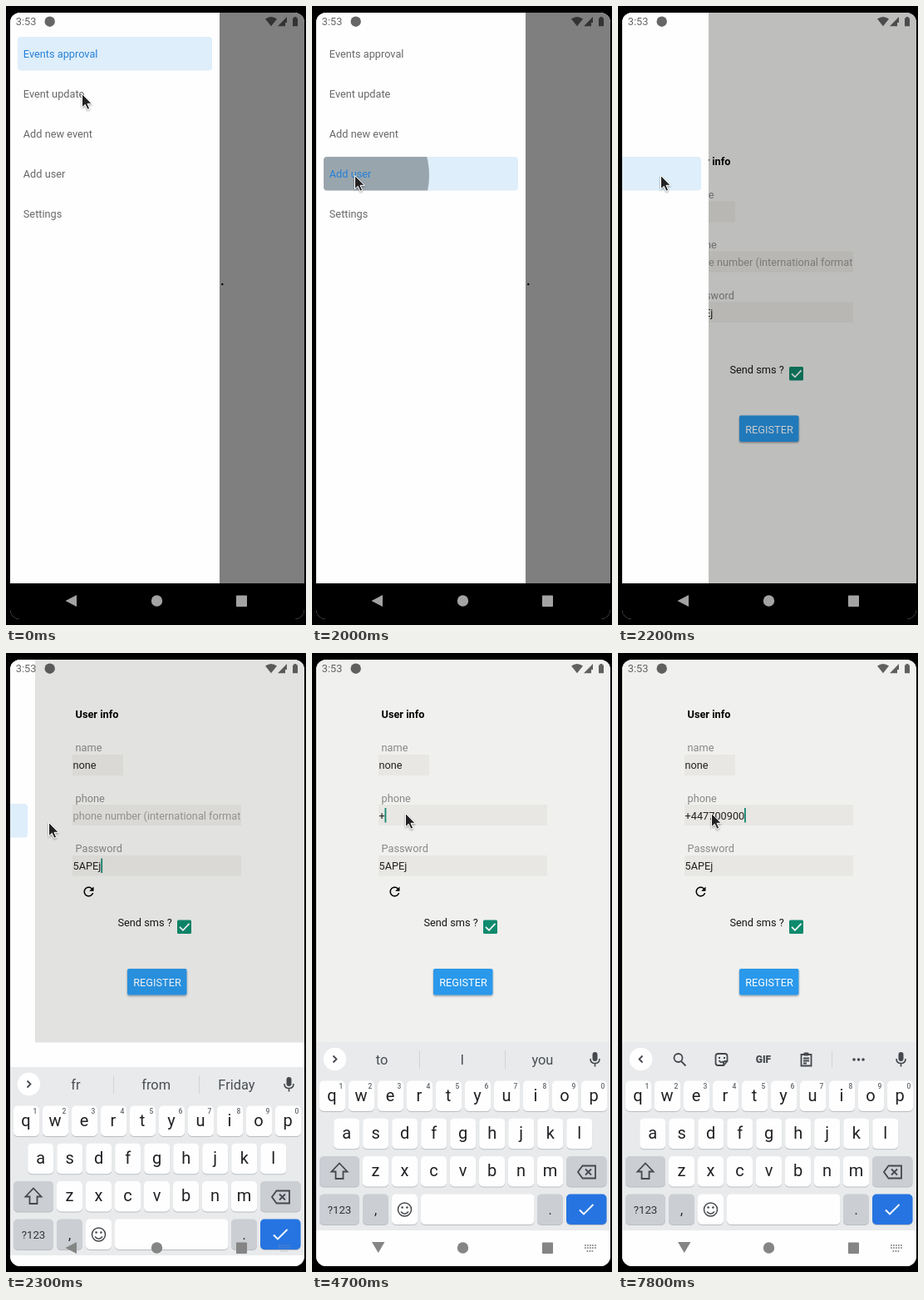
Animation of 361 by 743 pixels, one loop 8000 ms. Source, as an HTML page:

```html
<!DOCTYPE html>
<html lang="en">
<head>
<meta charset="utf-8">
<title>User registration demo</title>
<style>
html, body { margin: 0; width: 100%; height: 100%; overflow: hidden; background: #000; }
svg { display: block; width: 361px; height: 743px; }
text { font: 12.75px Roboto, sans-serif; white-space: pre; }
.label { fill: #888; }
.value { fill: #222; }
.field { fill: #e8e7e3; }
.caret { fill: #14866f; }
.key { fill: #fefefe; }
.fn { fill: #cbced3; }
.line { fill: none; stroke: #45484c; stroke-width: 1.8; }
.big { font-size: 20px; fill: #202124; }
.hint { font-size: 8.5px; font-weight: 500; fill: #63676b; }
.word { font-size: 16.4px; fill: #4a4d51; }
.mid { text-anchor: middle; }
</style>
</head>
<body>
<svg viewBox="0 0 361 743">
  <defs>
    <clipPath id="screen"><rect x="5" y="8" width="354" height="728" rx="12"/></clipPath>
    <clipPath id="phoneClip"><rect x="80" y="182" width="203" height="25"/></clipPath>
    <clipPath id="itemClip"><rect x="14" y="181" width="234" height="40.5" rx="4"/></clipPath>
    <filter id="soft" x="-30%" y="-30%" width="160%" height="180%">
      <feDropShadow dx="0" dy="1.2" stdDeviation="1.2" flood-opacity=".4"/>
    </filter>
  </defs>
  <rect width="361" height="743"/>
  <g clip-path="url(#screen)">
    <rect x="5" y="8" width="354" height="728" fill="#fefefe"/>
    <rect id="page" x="5" y="8" width="354"/>
    <circle id="dot" cx="260.3" cy="334" r="1.2"/>
    <g id="form">
      <text x="83.5" y="78" font-weight="700" style="font-weight:700">User info</text>
      <text class="label" x="83.5" y="118">name</text>
      <rect class="field" x="80" y="122" width="61" height="25"/>
      <text class="value" x="80.5" y="139">none</text>
      <text class="label" x="83.5" y="178.5">phone</text>
      <rect class="field" x="80" y="182" width="203" height="25"/>
      <g clip-path="url(#phoneClip)">
        <text id="empty" x="80.5" y="199.5" fill="#999">phone number (international format)</text>
        <text id="phone" class="value" x="80.5" y="199.5"></text>
      </g>
      <rect id="phoneCaret" class="caret" y="186" width="1.8" height="17.5"/>
      <text class="label" x="83.5" y="239">Password</text>
      <rect class="field" x="80" y="243" width="203" height="24.5"/>
      <text id="pass" class="value" x="80.5" y="260">5APEj</text>
      <rect id="passCaret" class="caret" x="114.3" y="246.5" width="1.8" height="17.5"/>
      <path transform="translate(90.5 277.5) scale(.75)" d="M17.65 6.35C16.2 4.9 14.21 4 12 4c-4.42 0-8 3.58-8 8s3.58 8 8 8c3.73 0 6.84-2.55 7.73-6h-2.08c-.82 2.33-3.04 4-5.65 4-3.31 0-6-2.69-6-6s2.69-6 6-6c1.66 0 3.14.69 4.22 1.78L13 11h7V4z"/>
      <text x="134.5" y="328" fill="#151515">Send sms ?</text>
      <rect x="206" y="320.5" width="17" height="16.5" rx="1.5" fill="#0e8a6d"/>
      <path d="M209 328.8l4 4 7.5-8" fill="none" stroke="#fff" stroke-width="1.7"/>
      <rect x="146" y="379" width="71.5" height="31.5" rx="2" fill="#2a98eb" filter="url(#soft)"/>
      <text class="mid" x="182" y="400" fill="#fff">REGISTER</text>
    </g>
    <rect id="scrim" x="5" y="8" width="354"/>
    <g id="drawer">
      <rect x="5" y="8" width="252" height="685" fill="#fefefe"/>
      <rect id="mark" x="14" width="234" height="40.5" rx="4" fill="#deeefa"/>
      <g clip-path="url(#itemClip)"><circle id="ripple" cx="51" cy="203" opacity=".31"/></g>
      <g id="items"></g>
    </g>
    <rect id="navBar" x="5" y="693" width="354" height="43"/>
    <g id="keyboard">
      <rect x="5" y="467" width="354" height="226" fill="#e8eaec"/>
      <circle cx="27.5" cy="487.5" r="13.7" fill="#fff"/>
      <path id="chevron" class="line"/>
      <g id="words"></g>
      <g id="tools">
        <circle class="line" cx="72.5" cy="486" r="5"/>
        <path class="line" d="M76 490l5.5 5.5"/>
        <path class="line" d="M127 495h-6.500q-3 0-3-3v-8q0-3 3-3h8q3 0 3 3v6zM127 495v-3q0-2 2-2h3M121.500 489q2.500 4 5 1"/>
        <path d="M121 485h2v2h-2zM127 485h2v2h-2z" fill="#45484c"/>
        <text class="mid" x="175" y="492" fill="#45484c" style="font-weight:900;font-size:12px">GIF</text>
        <path class="line" d="M220.500 482h12v13.500h-12zM223 486.500h7M223 489.500h7M223 492.500h4"/>
        <rect x="223.500" y="479.500" width="6" height="4" rx="1" fill="#45484c"/>
        <path d="M257.500 477.500v20" stroke="#d2d5d8"/>
        <g fill="#45484c"><circle cx="284" cy="488" r="1.800"/><circle cx="289.500" cy="488" r="1.800"/><circle cx="295" cy="488" r="1.800"/></g>
      </g>
      <rect x="337.500" y="479" width="6" height="11" rx="3" fill="#45484c"/>
      <path class="line" d="M335 487q0 5.500 5.500 5.500t5.500-5.500M340.500 492.500v4" style="stroke-width:1.6"/>
      <g id="keys"></g>
      <path class="line" d="M33 612.500l9.500 10h-5v8.500h-9v-8.500h-5z"/>
      <path class="line" d="M325.500 615.500h15.500v15h-15.500l-5.500-7.500zM329 619.500l7 7M336 619.500l-7 7"/>
      <text class="mid" x="33" y="673" fill="#333" style="font-size:13.300px">?123</text>
      <text class="mid big" x="76.500" y="674" style="font-size:16px">,</text>
      <text class="mid big" x="286.500" y="674" style="font-size:16px">.</text>
      <circle class="line" cx="111.500" cy="668" r="8" style="stroke-width:1.500"/>
      <path class="line" d="M107 670.500q4.500 5.500 9 0" style="stroke-width:1.500"/>
      <g fill="#45484c"><circle cx="108.600" cy="665.500" r="1.300"/><circle cx="114.400" cy="665.500" r="1.300"/></g>
      <path d="M322 668.500l5 5 11.500-11.500" fill="none" stroke="#fff" stroke-width="1.900"/>
    </g>
    <g id="nav">
      <path id="back"/>
      <circle cx="181.500" cy="714" r="6.700"/>
      <rect x="277" y="707.500" width="13" height="13.500" rx=".8"/>
      <path id="imeIcon" d="M328 711h14M328 714h14M330.500 718h9" fill="none" stroke="#999" stroke-width="1.800" stroke-dasharray="1.800 1.200"/>
    </g>
    <g opacity=".6">
      <text x="11.800" y="23.300">3:53</text>
      <circle cx="52.700" cy="18.700" r="6.200"/>
      <path d="M312 15.500q7-5 14 0l-7 8.700z"/>
      <path d="M327 24.200l11-11.200v7h-2v4.200z"/>
      <path d="M345 14.500h1.500v-1.500h3v1.500h1.500v9.700h-6z"/>
    </g>
  </g>
  <path id="cursor" d="M.5.5v16.300l3.800-3.500 2.700 6 2.700-1.200-2.700-5.800h5.200z" fill="#222" stroke="#fff" stroke-width="1" filter="url(#soft)"/>
</svg>
<script>
const $ = id => document.getElementById(id);
const LOOP = 8000, STEP = 100;

// Rows of [time, value...]; each holds until the next one.
const pointer = [
  [0, 91, 105], [100, 91, 102], [300, 91, 97], [400, 90, 92], [500, 86, 101], [600, 82, 115],
  [700, 77, 131], [800, 73, 143], [900, 72, 148], [1200, 71, 150], [1300, 69, 138], [1400, 67, 125],
  [1600, 62, 150], [1700, 54, 188], [1800, 51, 203], [2800, 70, 201], [2900, 100, 194], [3000, 111, 192],
  [3100, 112, 192]
];
const slide = [[0, 0], [2100, 59], [2200, 148], [2300, 222], [2400, 247], [2500, 252]];
const ripples = [[0, 0], [2000, 90], [2100, 192], [2200, 0]];
const rise = [[0, 300], [2300, 30], [2400, 5], [2500, 0]];
const strips = [[0, "fr from Friday"], [2600, ""], [4700, "to I you"], [4900, ""]];
const carets = [
  [0, ""], [2300, "pass"], [2800, ""], [3200, "pass"], [3500, "phone"], [4000, ""],
  [4400, "phone"], [5800, ""], [6200, "phone"]
];
const number = "+447700900";
const strokes = [4400, 4800, 4900, 5200, 6400, 6500, 6900, 7100, 7600, 7800];

const at = (rows, t) => rows.filter(r => r[0] <= t).pop().slice(1);
const show = (id, on) => $(id).setAttribute("visibility", on ? "visible" : "hidden");
const set = (id, attrs) => {
  for (const name in attrs) $(id).setAttribute(name, attrs[name]);
};

const labels = ["Events approval", "Event update", "Add new event", "Add user", "Settings"];
$("items").innerHTML = labels.map((s, i) => `<text x="20.800" y="${62 + 48 * i}">${s}</text>`).join("");

function key(x, y, w, fill) {
  const box = (dy, f) => `<rect x="${x}" y="${y + dy}" width="${w}" height="36.500" rx="5" ${f}/>`;
  return box(1, 'fill="#b9bdc1"') + box(0, fill);
}

function buildKeys() {
  const plain = 'class="key"', dim = 'class="fn"';
  let out = "";
  [["qwertyuiop", 24.5, 513.5], ["asdfghjkl", 41.7, 558.7], ["zxcvbnm", 76.5, 604]].forEach(([row, x0, y], r) => {
    [...row].forEach((c, i) => {
      const x = x0 + 35 * i;
      out += key(x - 15.5, y, 31, plain) + `<text class="mid big" x="${x - (r ? 0 : .5)}" y="${y + 24.3}">${c}</text>`;
      if (!r) out += `<text class="mid hint" x="${x + 10.5}" y="${y + 9.5}">${(i + 1) % 10}</text>`;
    });
  });
  out += key(9, 604, 48, dim) + key(306, 604, 48.5, dim);
  out += key(9, 649.5, 48, dim) + key(61, 649.5, 31, dim) + key(96, 649.5, 31, plain);
  out += key(131, 649.5, 136.5, plain) + key(271, 649.5, 31, dim) + key(306, 649.5, 48.5, 'fill="#2674e1"');
  $("keys").innerHTML = out;
}

function drawStrip(words) {
  set("chevron", { d: words ? "M25.500 483.500l4 4-4 4" : "M29.500 483.500l-4 4 4 4" });
  show("tools", !words);
  $("words").innerHTML = !words ? "" : '<path d="M129.500 477v22M232.500 477v22" stroke="#d2d5d8"/>' +
    words.split(" ").map((w, i) => `<text class="mid word" x="${84 + 96.7 * i}" y="494">${w}</text>`).join("");
}

function draw(t) {
  const [shift] = at(slide, t);
  const open = 1 - shift / 252;
  const onForm = t >= 2100, typing = t >= 2300;
  const bottom = typing ? 467.5 : 693;

  set("page", { height: bottom - 8, fill: onForm ? "#f0f0ee" : "#fff" });
  show("dot", !onForm);
  set("form", { transform: `translate(0 ${typing ? 0 : 112.5})`, display: onForm ? "inline" : "none" });
  set("scrim", { height: bottom - 8, opacity: open * .5 });

  const chosen = t >= 2000 ? 3 : 0;
  set("drawer", { transform: `translate(${-shift} 0)` });
  set("mark", { y: 37 + 48 * chosen });
  set("ripple", { r: at(ripples, t)[0] });
  [...$("items").children].forEach((el, i) => el.setAttribute("fill", i === chosen ? "#2581d8" : "#686868"));

  const text = number.slice(0, strokes.filter(s => s <= t).length);
  const [caret] = at(carets, t);
  $("phone").textContent = text;
  set("empty", { display: text ? "none" : "inline" });
  set("phoneCaret", { x: 80.3 + (text ? $("phone").getComputedTextLength() : 0), display: caret === "phone" ? "inline" : "none" });
  set("passCaret", { display: caret === "pass" ? "inline" : "none" });

  const settled = t >= 2400;
  set("keyboard", { transform: `translate(0 ${at(rise, t)[0]})`, display: typing ? "inline" : "none" });
  drawStrip(at(strips, t)[0]);
  set("navBar", { fill: typing ? "#fefefe" : "#000" });
  set("nav", { fill: typing ? "#858585" : "#a3a3a3" });
  set("back", { d: settled ? "M72 707h15.500l-7.750 13z" : "M85 707v14l-13.500-7z" });
  set("imeIcon", { display: typing ? "inline" : "none", opacity: settled ? 1 : .3 });
  set("cursor", { transform: `translate(${at(pointer, t).join(" ")})` });
}

buildKeys();
const start = performance.now();
let last = -1;
function tick() {
  const t = Math.floor((performance.now() - start) % LOOP / STEP) * STEP;
  if (t !== last) draw(last = t);
  requestAnimationFrame(tick);
}
tick();
</script>
</body>
</html>
```
